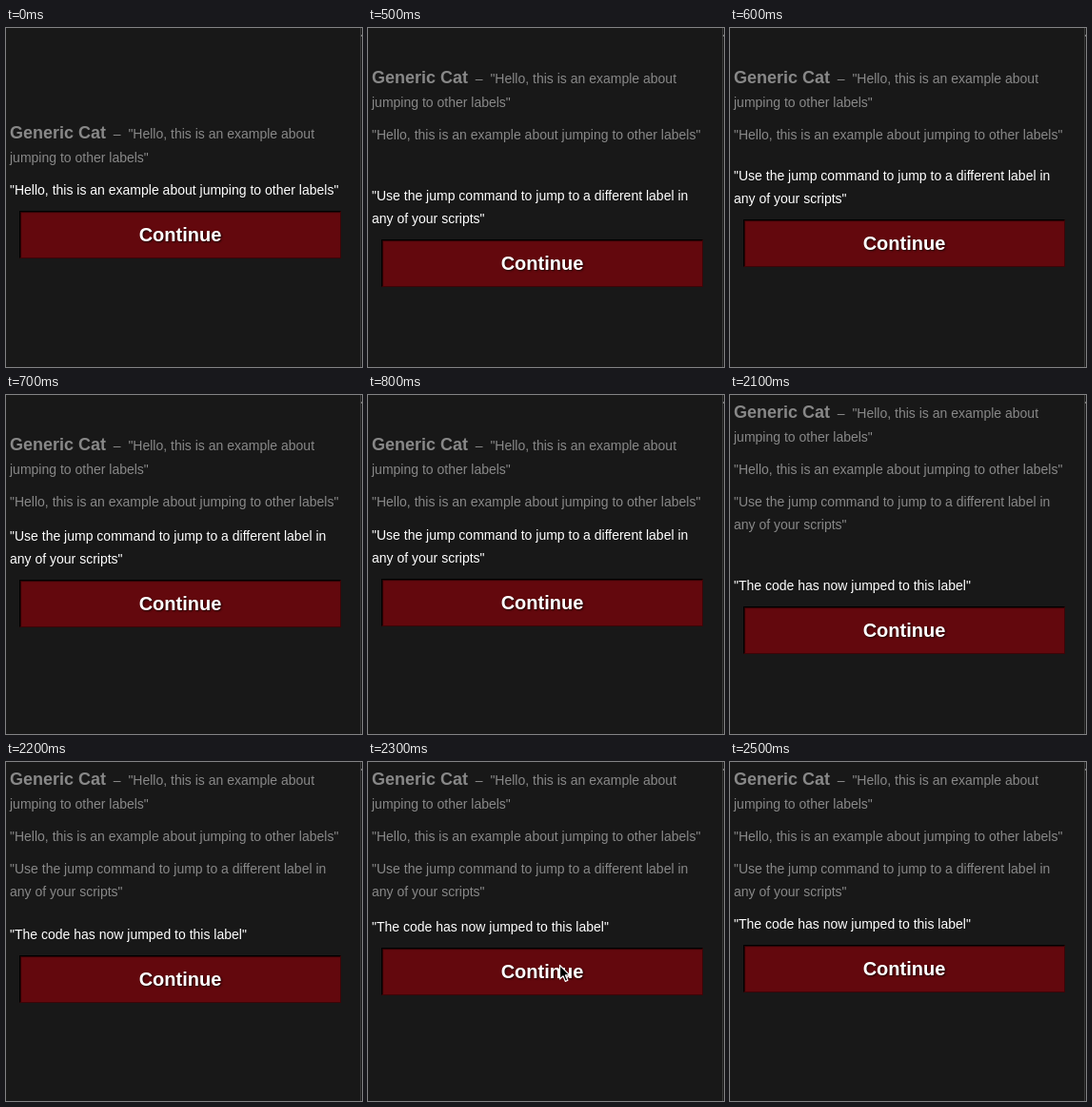
These frames come from a looping animation (374 by 356 pixels, 2.8 s). An HTML page:

```html
<!DOCTYPE html>
<html lang="en">
<head>
<meta charset="utf-8">
<title>Jump to label</title>
<style>
  html, body { margin: 0; width: 100%; height: 100%; overflow: hidden; background: #181818; }
  #stage {
    position: absolute; left: 0; top: 0; width: 374px; height: 356px; overflow: hidden;
    background: #181818; font: 14px/24px "Liberation Sans", Arial, sans-serif;
  }
  #stage div, #cursor { position: absolute; }
  .line { left: 4px; white-space: pre; color: #fff; }
  .old { color: #888; }
  .name { font-size: 18px; line-height: 1; font-weight: bold; }
  #button {
    left: 14px; width: 338px; height: 50px; box-sizing: border-box;
    border: 1px solid; border-color: #000 #3c0508 #3c0508 #000;
    background: #63080d; box-shadow: inset 1px 1px 1px #2a0305;
    color: #fff; font-size: 20px; line-height: 48px; font-weight: bold;
    text-align: center; text-shadow: 1px 1px 2px rgba(0, 0, 0, .75);
  }
  #edge { left: 372px; top: 0; width: 1px; height: 356px; background: #3a3a3a; }
  #mark { left: 373px; top: 7px; width: 1px; height: 2px; background: #777; }
  #cursor { left: 200px; top: 212px; }
</style>
</head>
<body>
<div id="stage">
  <div id="button">Continue</div>
  <div id="edge"></div>
  <div id="mark"></div>
  <svg id="cursor" width="14" height="21" viewBox="0 0 14 21">
    <path d="M1.5 1.5V16L5 12.8L7.4 18.4L9.9 17.3L7.5 11.9H12Z"
          fill="#000" stroke="#fff" stroke-width="1.2" stroke-linejoin="round"/>
  </svg>
</div>
<script>
  const LOOP = 2800, STEP = 100, ASCENT = 17, BUTTON_TOP = 192;
  const stage = document.getElementById("stage");
  const button = document.getElementById("button");
  const cursor = document.getElementById("cursor");

  // Each line: passage it belongs to, baseline, text
  const lines = [
    [0, 116, '<span class="name">Generic Cat</span>  –  "Hello, this is an example about'],
    [0, 141, 'jumping to other labels"'],
    [1, 175, '"Hello, this is an example about jumping to other labels"'],
    [2, 209, '"Use the jump command to jump to a different label in'],
    [2, 233, 'any of your scripts"'],
    [3, 267, '"The code has now jumped to this label"']
  ].map(([passage, y, html]) => {
    const el = document.createElement("div");
    el.className = "line";
    el.innerHTML = html;
    stage.insertBefore(el, button);
    return { passage, y, el };
  });

  // drops: how far the new passage still has to rise, per step
  const scenes = [
    { start: 0, passage: 1, scroll: 0, drops: [0] },
    { start: 500, passage: 2, scroll: 58, drops: [30, 9, 2, 1, 0.5, 0] },
    { start: 2100, passage: 3, scroll: 92, drops: [30, 11, 3, 1, 0] }
  ];

  function draw(t) {
    const scene = scenes.filter(s => s.start <= t).pop();
    const step = Math.floor((t - scene.start) / STEP);
    const drop = scene.drops[Math.min(step, scene.drops.length - 1)];
    for (const { passage, y, el } of lines) {
      const current = passage === scene.passage;
      el.style.display = passage > scene.passage ? "none" : "block";
      el.classList.toggle("old", !current);
      el.style.top = y - ASCENT - scene.scroll + (current ? drop : 0) + "px";
    }
    button.style.top = BUTTON_TOP + drop + "px";
    cursor.style.display = t >= 2300 && t < 2400 ? "block" : "none";
  }

  function tick() {
    draw(performance.now() % LOOP);
    requestAnimationFrame(tick);
  }
  tick();
</script>
</body>
</html>
```
